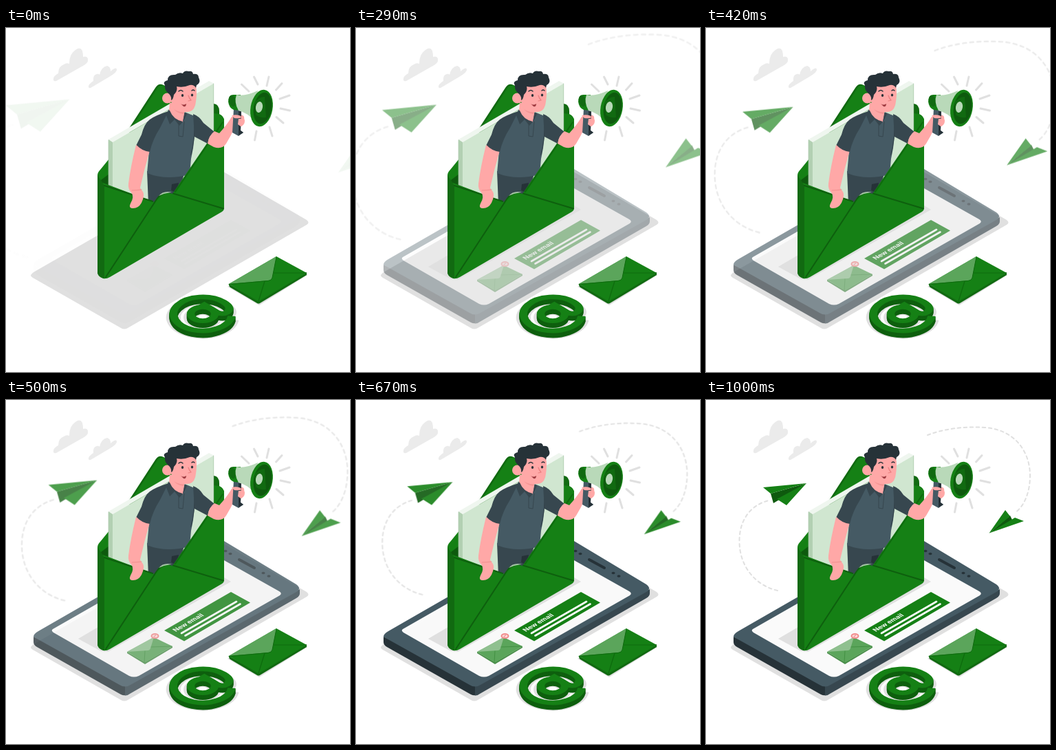
These frames come from a looping animation (500x500 px, 1040 ms). An HTML page:

```html
<!DOCTYPE html>
<html lang="en">
<head>
<meta charset="utf-8">
<title>New email</title>
<style>
  html, body { margin: 0; width: 100%; height: 100%; overflow: hidden; background: #fff; }
  svg { display: block; width: 100vw; height: 100vh; }
  #sky { transform-origin: 260px 158px; }
  .green { fill: #158015; }
  .mid { fill: #116a11; }
  .dark { fill: #0e5a0e; }
  .soft { fill: #5ba55b; }
  .grey { fill: #e0e0e0; }
  .cloud { fill: #ebebeb; }
  .ink { fill: #263238; }
  .slate { fill: #37474f; }
  .shirt { fill: #455a64; }
  .skin { fill: #ffa8a7; }
  .pale { fill: #d0e6d0; }
  .line { fill: none; stroke-linecap: round; stroke-linejoin: round; }
  .seam { stroke: #0e5f0e; stroke-width: 2; }
  text { font: 700 9.4px Inter, "Open Sans", sans-serif; fill: #fff; }
</style>
</head>
<body>
<svg viewBox="0 0 500 500">
  <defs>
    <!-- flat sign laid on the ground plane -->
    <g id="at" fill="none" transform="translate(286 415.5) scale(1 .577) rotate(-45)">
      <circle r="17.500"/>
      <path d="M17.500,-20 V10 Q18,22 28,22 Q42,20 42.500,0 A42.500,42.500 0 1 0 26,33.500"/>
    </g>
  </defs>

  <path class="grey" d="M36,360 Q36,358 40,355 L301,205 Q306,203 311,206 L437,279 Q442,283 437,286 L177,436 Q172,439 167,436 L39,363 Q36,361 36,360Z"/>
  <path class="cloud" d="M69,76 Q68,70 76,66 Q76,56 84,53 Q88,50 92,52 Q92,36 104,30 Q112,27 112,42 Q120,40 119,48 Q118,52 110,56 L73,77 Q70,78 69,76Z"/>
  <path class="cloud" d="M120,86 Q119,82 127,77 Q126,68 132,67 Q135,66 136,68 Q138,57 147,55 Q152,56 152,63 Q160,56 161,60 Q162,64 150,71 L123,87 Q121,88 120,86Z"/>

  <g id="sky">
    <g class="line" stroke="#e0e0e0" stroke-width="2" stroke-dasharray="4.5 4.5">
      <path d="M104,277 C73,270 48.500,243 48.500,205 C48.500,175 64,153 91,146"/>
      <path d="M322,51 C345,42 375,38 405,40 C449,43 471,75 471,110 C471,135 462,155 449,164"/>
    </g>
    <path class="dark" d="M94,136 L146,121 L98,150Z"/>
    <path class="green" d="M83,127 L146,121 L94,136Z M103,144 L146,121 L117,153Z"/>
    <path class="dark" d="M411.5,193.5 L442,168 L446,176Z"/>
    <path class="green" d="M411.5,193.5 L435,160 L442,169Z M411.5,193.5 L449,171 L462,176Z"/>
  </g>

  <g id="phone">
    <path class="ink" d="M40,344 V352 Q40,356 45,359 L167,428 Q171,430 174,429 V408Z"/>
    <path class="slate" d="M173,408 V429.500 Q176,430 180,427 L422,288 Q427,285 427,281 V275Z"/>
    <path class="shirt" d="M40,344 Q40,340 47,336 L294,194 Q300,191 307,199 L422,268 Q430,274 422,279 L181,414 Q173,419 165,414 L45,347 Q41,345 40,344Z"/>
    <path fill="#fafafa" d="M68,333 L290,206 L317,233 L397,278 Q402,281 398,284 L193,401 Q186,404 179,401 L69,338 Q65,335 68,333Z"/>
    <path class="line" stroke="#263238" stroke-width="4" d="M339,232 L361,244"/>
    <g class="ink">
      <ellipse cx="319" cy="219.500" rx="2.500" ry="1.800"/><ellipse cx="326" cy="223.500" rx="2.500" ry="1.800"/>
      <ellipse cx="374" cy="251.500" rx="2.500" ry="1.800"/><ellipse cx="382" cy="256" rx="2.500" ry="1.800"/>
    </g>
    <path class="grey" d="M105,347 L134,330 L317,258 L327,264 L148,366 L138,365Z"/>
    <path class="green" d="M230,335 L327,279 L355,294.500 L259,350.500Z"/>
    <text transform="matrix(.866 -.5 .866 .5 247 337)">New email</text>
    <path class="line" stroke="#fff" stroke-width="2.600" d="M255,339 L335,293 M260.500,342.500 L340.500,296.500"/>
    <path class="mid" opacity=".75" d="M176,366 L202,381 L242,358 V360 L202,384 L176,368Z"/>
    <path class="soft" d="M176,366 L215,345 L242,358 L202,381.500Z"/>
    <path fill="#8fc08f" d="M176,366 L215,344.500 L210,361 Q209,364 206,364Z"/>
    <path class="line" stroke="#3d8b3d" stroke-width=".8" d="M211,359 L241,358 M202,365 L201,381"/>
    <ellipse cx="216.500" cy="343" rx="5" ry="3" fill="#fbdcdc" stroke="#f28b8b" stroke-width="2"/>
    <path class="line" stroke="#f28b8b" stroke-width="1.200" d="M215,344 L217.500,342"/>
  </g>

  <!-- envelope back and letter -->
  <path class="mid" d="M178,147 L217,87 Q222,79 229,83 L302,110 Q310,111 310,121 V160 L200,230Z"/>
  <path class="green" d="M182,146 L219,89 Q223,82 230,84 L240,89 L240,130Z M302,124 L310,125 Q317,128 317,135 V200 H290Z"/>
  <path class="green" d="M133,214 Q133,210 137,206 L150,190 V235 H133Z"/>
  <path class="dark" d="M138,221 L150,212 V236 L141,230Z"/>
  <path fill="#eff6ef" d="M149,162 L295,77 L302,80.500 L155,166Z"/>
  <path fill="#b2d0b2" d="M149,162 L155,166 V240 L149,235Z"/>
  <path class="pale" d="M155,166 L302,80.500 V170 L240,250 L205,253 L155,234Z"/>
  <path class="line" stroke="#a9c8a9" stroke-width=".7" d="M149,163 V232 M301.700,81 V150"/>

  <!-- man -->
  <path class="slate" d="M205,208 L207,256 L250,245 L260,208Z"/>
  <path class="ink" d="M241,227 L251,225 L248,240 L240,236Z"/>
  <path class="shirt" d="M236,122 L212,132 Q204,160 208,178 L205,211 Q233,222 267,213 L269,190 Q276,160 274,128 L262,123Z"/>
  <path class="skin" d="M238,108 L237,121 Q243,135 257,137 L260,119Z"/>
  <path fill="#f59695" d="M244,118 Q251,123 259,122 L258,125 Q249,124 244,118Z"/>
  <path class="skin" d="M241,84 Q255,76 276,84 Q278,94 276,107 Q275,119 267,121.500 Q253,124 244,117 L240,107Z"/>
  <ellipse class="skin" cx="234.500" cy="102" rx="7.500" ry="7.500"/>
  <path class="ink" d="M236,95 Q230,90 231,83 Q227,78 235,76 Q235,67 246,68 Q251,64 257,66 Q259,61 266,63 Q271,62 272,67 Q280,66 280,72 Q284,79 277,83 L276,87 Q273,82 267,83 Q258,87 248,85 Q250,91 244,97 Q243,104 240,105 Q241,99 236,95Z"/>
  <path class="line" stroke="#263238" stroke-width="1.400" d="M251,92 Q254,89 257,92 M270,91 Q272,89 274,91"/>
  <g class="ink"><ellipse cx="256.500" cy="98" rx="1.700" ry="2"/><ellipse cx="270.500" cy="97.500" rx="1.600" ry="2"/></g>
  <path class="line" stroke="#e98080" stroke-width="1.200" d="M265,98 Q266,102 269,105 L265,106"/>
  <path fill="#9c3a40" d="M254,110 Q258,113 262,110 Q262,115 258,114Z"/>
  <path class="slate" d="M236,119 L233,127 L238,140 L245,133 L252,142 L258,135 L263,125 L260,122 L257,136 Q243,133 238,120Z"/>
  <path class="line" stroke="#37474f" stroke-width="1" d="M251,139 V157 L257,158 L259,136"/>
  <path class="line" stroke="#263238" stroke-width=".7" d="M274,138 Q275,158 269,184"/>

  <!-- envelope front -->
  <path class="green" d="M317,131 L242,241 Q230,236 222,245 L215,253 L138,224 L133,214 V356 Q134,361 141,364 Q146,365 151,362 L314,267 Q317,265 317,262Z"/>
  <path class="mid" d="M133,214 L143,229 V364 Q134,362 133,356Z"/>
  <path class="line seam" d="M145,362 L219,249 Q223,243 230,240 M243,240.500 L316,262.500 M143,229 L213,252"/>
  <path class="line" stroke="#0e6a0e" stroke-width="2" d="M315,137 L246,238"/>
  <path fill="#a8c8a8" d="M222,244 Q228,236 241,238.500 Q231,240 222,244Z"/>
  <path class="skin" d="M189,170 Q181,202 178,226 Q177,234 182,239 Q187,245 181,255 Q178,261 183,262 Q192,263 197,254 Q202,243 199,238 Q195,233 195,232 Q201,205 209,178Z"/>
  <path class="slate" d="M236,121 Q217,127 209,133 Q201,139 197,155 L189.500,170 Q198,179 209,180 Q213,162 224,145Z"/>
  <path class="line" stroke="#ee8c8c" stroke-width=".9" d="M183,236 Q190,236 197,235"/>

  <!-- raised arm and megaphone -->
  <path class="slate" d="M272,125 Q281,128 287,138 L303,151 Q295,156 293,168 L274,158Z"/>
  <path class="skin" d="M303,150 L310,153 Q321,141 328,129 L334,126 Q344,125 346,129 Q348,140 342,143 L333,143 Q327,157 320,168 Q314,177 302,173 L293,168 Q295,156 303,150Z"/>
  <path class="shirt" d="M331,117 L342,121 L341,149 L345,152 L338,157 L329,152Z"/>
  <path class="ink" d="M338,121 L342,121 L341,149 L345,152 L338,156Z"/>
  <path class="skin" d="M328,127 Q338,125 342,129 Q343,132 332,131 Z M338,132 Q347,130 347,135 Q347,141 341,143 L337,140Z"/>
  <path class="green" d="M330,97 Q323,98 323,107 Q324,116 331,119 L341,120 L341,97Z"/>
  <ellipse class="mid" cx="329" cy="106" rx="5" ry="8.500" transform="rotate(-12 329 106)"/>
  <path fill="#b9d9b9" d="M335,97 Q347,100 366,91 L362,136 Q351,123 338,120 Q331,108 335,97Z"/>
  <ellipse class="green" cx="371.500" cy="116.500" rx="16" ry="27" transform="rotate(10 371.500 116.500)"/>
  <ellipse class="dark" cx="373" cy="116.500" rx="13" ry="23" transform="rotate(10 373 116.500)"/>
  <path class="mid" d="M362,108 Q367,100 376,100 L378,130 Q368,131 363,126Z"/>
  <ellipse fill="#b9d9b9" cx="368" cy="115" rx="5" ry="8" transform="rotate(10 368 115)"/>
  <path class="line" stroke="#e0e0e0" stroke-width="3" d="M342.500,82 L353,92 M360.500,71 L366,82 M382,71 L379,84 M401,80.500 L392.500,90 M412,98 L398,103 M412.500,120 L399,117 M403,138 L393,129.500 M387,157 L383,144 M361.500,163 L364,150"/>

  <!-- at sign -->
  <use href="#at" y="5.500" stroke="#e0e0e0" stroke-width="21"/>
  <g id="depth" stroke="#0e5f0e" stroke-width="11.500"></g>
  <use href="#at" stroke="#158015" stroke-width="11.500"/>

  <!-- small envelope -->
  <path class="grey" d="M322,376 L393,335 L438,359 L368,403Z"/>
  <path class="mid" d="M324,372 L367,396 L437,355 V359 L369,400 Q367,401 365,400 L326,377 Q324,376 324,372Z"/>
  <path class="green" d="M324,372 L393,332 L437,356 L367,397.500Z"/>
  <path class="line" stroke="#0e6a0e" stroke-width="1.200" d="M389,356 L436,356 M376,368 L367,397"/>
  <path class="soft" d="M324,372 L393,332 L387,363 Q386,367 381,367Z"/>
  <path class="line" stroke="#0e6a0e" stroke-width="1" d="M324,372.500 L381,367.500 Q386,367 387,363 L393,333"/>
</svg>
<script>
  const LOOP = 1040, FPS = 24, FRAMES = 25;
  const $ = id => document.getElementById(id);

  // Stack copies below the top face to give the sign its thickness.
  for (let y = 7; y > 0; y--) {
    const layer = document.createElementNS("http://www.w3.org/2000/svg", "use");
    layer.setAttribute("href", "#at");
    layer.setAttribute("y", y);
    $("depth").append(layer);
  }

  const hold = (id, steps, easing) => {
    const anim = $(id).animate(steps, { duration: 1000, easing, fill: "both" });
    anim.pause();
    return anim;
  };

  const parts = [
    hold("sky", [
      { opacity: 0, transform: "scale(1.5)" },
      { opacity: 1, transform: "scale(1)" }
    ], "cubic-bezier(.39, .575, .565, 1)"),
    hold("phone", [{ opacity: 0 }, { opacity: 1 }], "cubic-bezier(.36, -.01, .5, 1.38)")
  ];

  const start = performance.now();

  function draw() {
    const t = Math.max(0, performance.now() - start) % LOOP;
    const tick = Math.floor(t / 10) * 10 + 4.9;
    const step = Math.min(FRAMES - 1, Math.floor(tick * FPS / 1000));
    for (const part of parts) part.currentTime = (step + 1) / FRAMES * 1000;
    requestAnimationFrame(draw);
  }
  draw();
</script>
</body>
</html>
```
